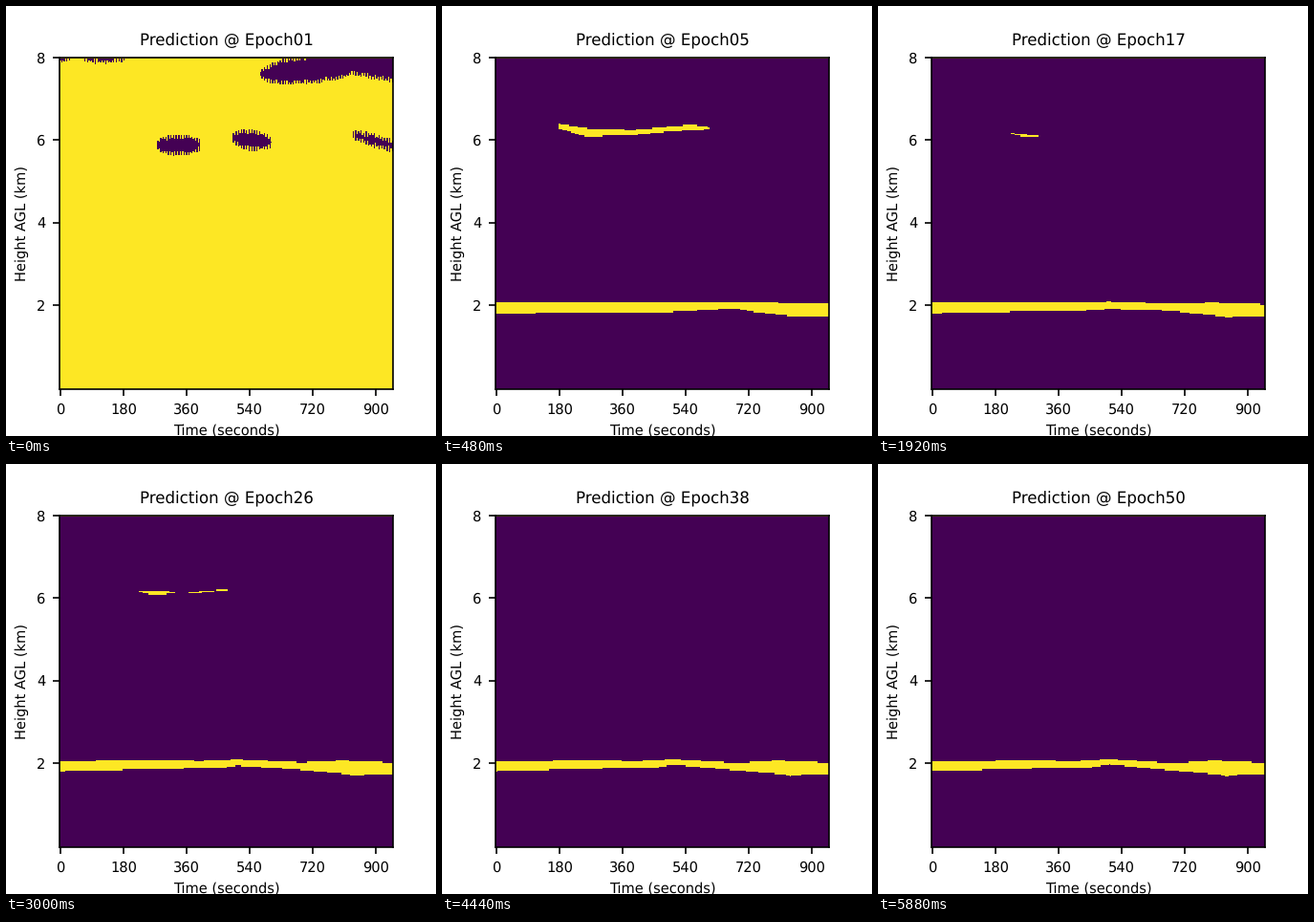
Animation, 450 px wide and 450 px high, one loop 6000 ms. Source, as a matplotlib script:

```python
import numpy as np
import matplotlib.pyplot as plt
from matplotlib.animation import FuncAnimation

EPOCHS = 50
LEFT, RIGHT, TOP, BOTTOM = 56, 405, 54, 401
CELL_W, CELL_H = 348.75 / 256, 346.5 / 256

plt.rcParams["font.family"] = "DejaVu Sans"
plt.rcParams["text.hinting"] = "none"

# The plot is drawn in stage pixels; the data keeps its coarser cells.
COLUMN = ((np.arange(LEFT, RIGHT) + 0.25 - LEFT) / CELL_W).astype(int)
X = LEFT + (COLUMN + 0.5) * CELL_W
Y = np.arange(TOP, BOTTOM)[:, None]


def to_cell(y):
    """Snap a height to the nearest cell edge, in whole pixels."""
    origin = TOP + 0.57
    return np.floor(origin + CELL_H * np.round((y - origin) / CELL_H))


def bump(x, centre, width):
    return np.exp(-((x - centre) / width) ** 2)


def band(upper, lower):
    return (Y >= to_cell(upper)) & (Y < to_cell(lower))


def low_layer(epoch):
    """The layer settles from its early outline into its final one."""
    early_top = np.interp(X, [56, 330, 375, 405], [309.9, 310.4, 311.8, 312])
    late_top = np.interp(X, [56, 165, 205, 241, 291, 310, 351, 405],
                         [311.8, 310.6, 311.5, 309.1, 312.4, 313.3, 310.7, 313])
    early_base = np.interp(X, [56, 105, 245, 290, 312, 325, 365, 405],
                           [322.4, 321.8, 320.5, 317.8, 317.8, 320.5, 325, 325.2])
    late_base = np.interp(X, [56, 160, 225, 242, 299, 358, 364, 380, 405],
                          [321.9, 319.2, 317.8, 315, 320.5, 325.7, 327.6, 325.5, 325.2])
    settled = 1 - np.exp(-max(epoch - 5, 0) / 16)
    settled /= 1 - np.exp(-(EPOCHS - 5) / 16)
    return band(early_top + settled * (late_top - early_top),
                early_base + settled * (late_base - early_base))


def high_cloud(epoch):
    """The thin cloud erodes from above, with a brief revival in two pieces."""
    knots = [122, 150, 200, 240, 262, 280]
    upper = np.interp(X, knots, [124, 128.3, 130, 126.5, 125, 127.3])
    lower = np.interp(X, knots, [128.5, 137, 135.5, 131.6, 130.4, 129.3])
    revival = bump(epoch, 26, 3) * (4.4 - ((X - 200) / 40) ** 2 - 3 * bump(X, 184, 9))
    upper = upper + np.interp(epoch, [5, 17, 33], [0, 6.6, 9.5]) - revival
    return band(upper, lower) & (X > knots[0]) & (X < knots[-1])


def first_guess():
    """Everything is filled except a few slanted ellipses with striped fringes."""
    rng = np.random.default_rng(4)
    odd = np.arange(256) % 2 == 1
    fringe = np.where(odd, rng.uniform(1, 3.5, 256), rng.uniform(-2.5, 0.5, 256))[COLUMN]
    mask = np.ones((BOTTOM - TOP, RIGHT - LEFT), bool)
    # left, right, centre height at each end, half thickness
    holes = [(158, 204, 146, 146, 8.5), (236, 278, 138.5, 143, 8),
             (363, 412, 135, 149, 4.5), (266, 370, 72, 62, 12.5),
             (300, 520, 44, 80, 17), (50, 67, 54, 54, 4), (80, 125, 54, 54, 4)]
    for left, right, y_left, y_right, half in holes:
        part = (X - left) / (right - left)
        centre = y_left + part * (y_right - y_left)
        reach = half * np.sqrt(np.clip(4 * part * (1 - part), 0, None)) + fringe
        inside = (part > 0) & (part < 1)
        mask &= ~(band(centre - reach, centre + reach) & inside)
    return mask


def prediction(epoch):
    mask = first_guess() if epoch == 1 else low_layer(epoch) | high_cloud(epoch)
    mask[0] = True
    return mask.astype(float)


fig, ax = plt.subplots(figsize=(3, 3), dpi=150)
image = ax.imshow(prediction(1), cmap="viridis", vmin=0, vmax=1, aspect="auto",
                  interpolation="nearest", extent=(LEFT, RIGHT, BOTTOM, TOP))
title = ax.set_title("Prediction @ Epoch01", fontsize=8)
ax.set_xlabel("Time (seconds)", fontsize=7)
ax.set_ylabel("Height AGL (km)", fontsize=7)
ax.set_xticks(56.9 + 66.07 * np.arange(6), [str(180 * i) for i in range(6)])
ax.set_yticks(54 + 86.35 * np.arange(4), ["8", "6", "4", "2"])
ax.tick_params(labelsize=7)
ax.set_xlim(56.25, 405)
ax.set_ylim(400.5, 54)


def update(frame):
    epoch = frame + 1
    image.set_data(prediction(epoch))
    title.set_text(f"Prediction @ Epoch{epoch:02d}")
    return image, title


anim = FuncAnimation(fig, update, frames=EPOCHS, interval=120, repeat=True, repeat_delay=0)
plt.show()
```
